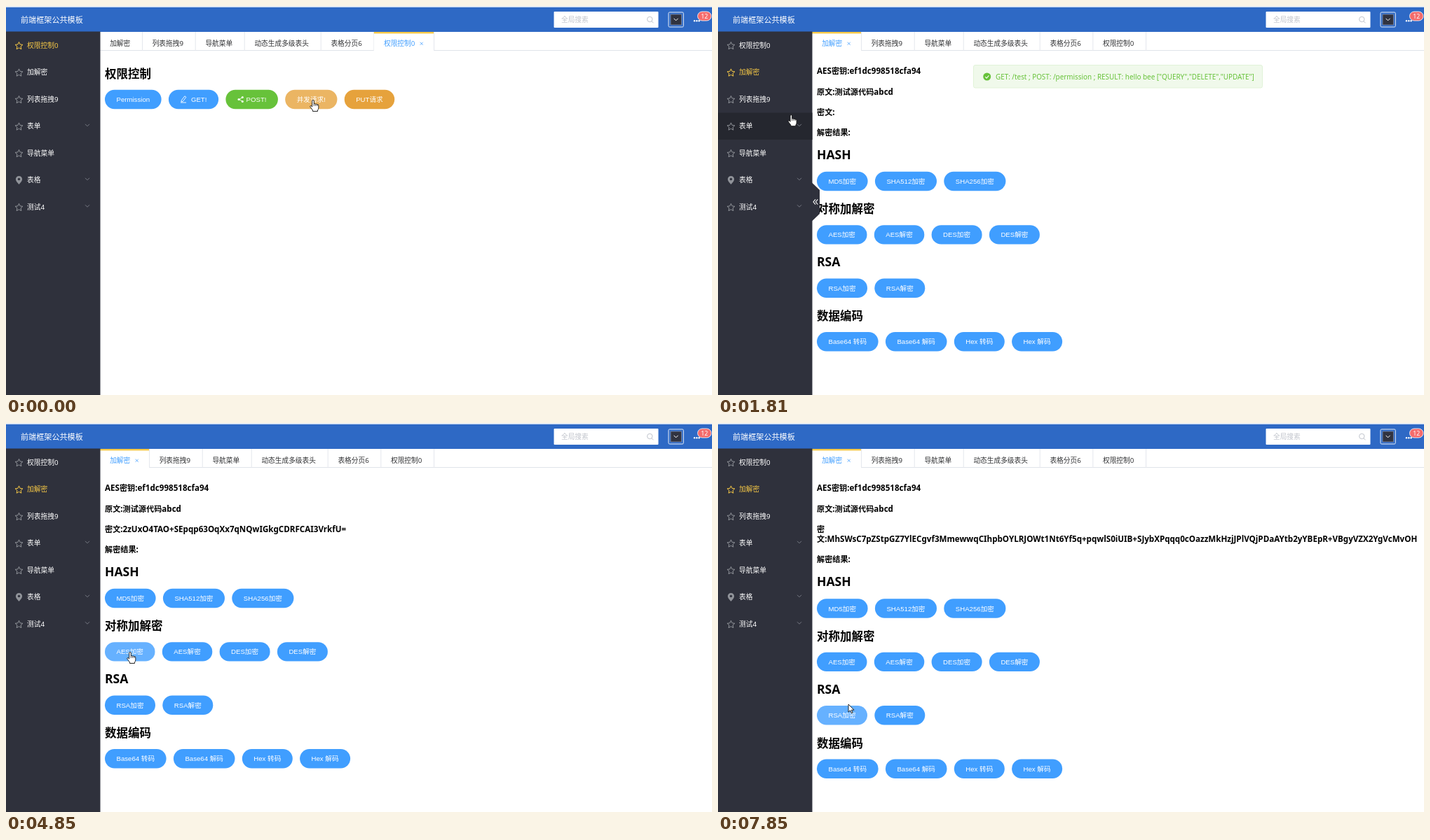
Write an HTML page that moves like this. It is 1007 px wide and 556 px high and loops after 8 s.

```html
<!DOCTYPE html>
<html lang="zh">
<head>
<meta charset="utf-8">
<style>
html, body { margin: 0; width: 100%; height: 100%; overflow: hidden; background: #fff; }
svg { display: block; width: 1007px; height: 556px; }
text { font-family: "Noto Sans", "Noto Sans CJK SC", "Noto Sans CJK", sans-serif; white-space: pre; }
.head { font-weight: 700; }
.menu { font-weight: 500; }
.button { font-family: "Liberation Sans", "Noto Sans CJK SC", "Noto Sans CJK", sans-serif; font-weight: 500; }
</style>
</head>
<body>
<svg id="stage" viewBox="0 0 1007 556"></svg>
<script>
const LOOP = 8000, SIDE = '#2f313c', HEADER = '#2e69c5', GOLD = '#f7c946', BLUE = '#409eff';
const LEFT = 141, GAP = 10.3;
const stage = document.getElementById('stage');

// Each move: first step, last step, number of steps, destination of the pointer tip
const START = [438, 135];
const MOVES = [
  [150, 1140, 8, 52, 94], [1410, 2240, 7, 185, 252], [2530, 2970, 4, 280, 257],
  [3240, 3240, 1, 330, 266], [3490, 3490, 1, 369, 271], [3890, 4420, 5, 177, 328],
  [4980, 5110, 2, 257, 330], [5520, 5780, 3, 339, 331], [6340, 6340, 1, 381, 329],
  [6480, 6620, 2, 424, 327], [7040, 7580, 5, 186, 402]
];

function hex(length, seed) {
  let out = '';
  while (out.length < length) {
    seed = (seed * 16807) % 2147483647;
    out += (seed >> 8 & 15).toString(16);
  }
  return out;
}

const PLAIN = '测试源代码abcd';
const AES = '2zUxO4TAO+SEpqp63OqXx7qNQwIGkgCDRFCAI3VrkfU=';
const DES = 'nJ6cKur4YQo4FRA8QLIJfyJcTw2yy9Hq';
const RSA = 'MhSWsC7pZStpGZ7YlECgvf3MmewwqCIhpbOYLRJOWt1Nt6Yf5q+pqwlS0iUIB+SJybXPqqq0cOazzMkHzjJPlVQjPDaAYtb2yYBEpR+VBgyVZX2YgVcMvOH';

const CLICKS = [
  { at: 0, cipher: '', focus: '并发请求!', result: '' },
  { at: 1410, cipher: '', focus: '', result: '' },
  { at: 2390, cipher: 'afb6fdd3a39e1b8c3383bd971473d141', focus: 'MD5加密', result: '' },
  { at: 3100, cipher: hex(128, 4711), focus: 'SHA512加密', result: '' },
  { at: 3620, cipher: 'b691730caab6d5bb3365252045febbbcf040e2c5bdc21e6f863e7827264a8816', focus: 'SHA256加密', result: '' },
  { at: 4570, cipher: AES, focus: 'AES加密', result: '' },
  { at: 5240, cipher: AES, focus: 'AES解密', result: PLAIN },
  { at: 5910, cipher: DES, focus: 'DES加密', result: '' },
  { at: 6760, cipher: DES, focus: 'DES解密', result: PLAIN },
  { at: 7715, cipher: RSA, focus: 'RSA加密', result: '' }
];

const MENU = ['权限控制0', '加解密', '列表拖拽9', '表单', '导航菜单', '表格', '测试4'];
const TABS = [['加解密', 60.5], ['列表拖拽9', 75.7], ['导航菜单', 70], ['动态生成多级表头', 109],
  ['表格分页6', 75.6], ['权限控制0', 75.7]];
const TONES = { blue: [BLUE, '#66b1ff'], green: ['#67c23a', '#85ce61'], amber: ['#e6a23c', '#ebb563'] };

// Button: label, width, tone, label offset when an icon precedes it
const ACTIONS = [['Permission', 80.6, 'blue'], ['GET!', 71.2, 'blue', 32], ['POST!', 74.5, 'green', 29.2],
  ['并发请求!', 74.2, 'amber'], ['PUT请求', 71.5, 'amber']];
const GROUPS = [
  ['HASH', 212.5, [['MD5加密', 72.6], ['SHA512加密', 88.1], ['SHA256加密', 88.1]]],
  ['对称加解密', 290, [['AES加密', 71.5], ['AES解密', 71.5], ['DES加密', 72], ['DES解密', 72]]],
  ['RSA', 366, [['RSA加密', 72], ['RSA解密', 72]]],
  ['数据编码', 443, [['Base64 转码', 87.6], ['Base64 解码', 87.6], ['Hex 转码', 72], ['Hex 解码', 72]]]
];

const rect = (x, y, w, h, fill, extra = '') =>
  `<rect x="${x}" y="${y}" width="${w}" height="${h}" fill="${fill}" ${extra}/>`;
const line = (d, stroke, width = 1, extra = '') =>
  `<path d="${d}" fill="none" stroke="${stroke}" stroke-width="${width}" ${extra}/>`;
const esc = s => s.replace(/&/g, '&amp;').replace(/</g, '&lt;');

// Text centred vertically on y; latin runs may use a slightly larger size
function text(s, x, y, size, fill, { cls = '', anchor = 'start', latin = size } = {}) {
  const runs = s.split(/([\u3000-\u9fff]+)/).filter(Boolean)
    .map(r => r > '\u3000' ? esc(r) : `<tspan font-size="${latin}">${esc(r)}</tspan>`).join('');
  return `<text x="${x}" y="${y + size * 0.365}" font-size="${size}" fill="${fill}" class="${cls}" text-anchor="${anchor}">${runs}</text>`;
}
const title = (s, y) => text(s, LEFT, y, 16.5, '#000', { cls: 'head', latin: 17.6 });
const field = (s, y) => text(s, LEFT, y, 11.15, '#000', { cls: 'head', latin: 11.6 });

function star(x, y, color) {
  let d = '';
  for (let i = 0; i < 10; i++) {
    const a = i * Math.PI / 5 - Math.PI / 2, r = i % 2 ? 2.7 : 5.7;
    d += `${i ? 'L' : 'M'}${(x + r * Math.cos(a)).toFixed(2)} ${(y + r * Math.sin(a)).toFixed(2)}`;
  }
  return line(d + 'Z', color, 1, 'stroke-linejoin="round"');
}
const chevron = (x, y, color) => line(`M${x - 3} ${y - 1.5}l3 3 3-3`, color);

function pointerAt(t) {
  let [x, y] = START;
  for (const [from, to, steps, tx, ty] of MOVES) {
    if (t < from) break;
    const step = steps > 1 ? Math.floor((t - from) / ((to - from) / (steps - 1)) + 1e-6) + 1 : 1;
    const p = Math.min(1, step / steps), e = p * p * (3 - 2 * p);
    x += (tx - x) * e;
    y += (ty - y) * e;
  }
  return { x, y };
}

function header() {
  return rect(0, 0, 1007, 37, HEADER) + rect(0, 0, 1007, 1.8, '#e9eff7') +
    text('前端框架公共模板', 21, 19.5, 11.1, '#fff', { cls: 'menu' }) +
    rect(781.5, 8, 149, 23, '#fff', 'rx="1"') + text('全局搜索', 792, 19.5, 9.7, '#c0c4cc') +
    `<circle cx="918.3" cy="19" r="3.7" fill="none" stroke="#c0c4cc"/>` + line('M921 21.8l2.5 2.5', '#c0c4cc') +
    rect(945, 9, 21.3, 21, HEADER, 'stroke="#e6edf7" rx="1.5"') + rect(948, 12, 15.3, 15, '#303340', 'stroke="#8993a8" stroke-width=".7"') +
    chevron(955.6, 19.3, '#fff') +
    [982, 985.3, 988.6].map(x => `<circle cx="${x}" cy="21.3" r="1.2" fill="#fff"/>`).join('') +
    rect(986.5, 8, 19.5, 13, '#f56c6c', 'rx="6.5" stroke="#fff" stroke-width=".8"') +
    text('12', 996.2, 14.6, 8.8, '#fff', { anchor: 'middle' });
}

function sidebar(active, pointer) {
  let out = rect(0, 36.5, 134.5, 520, SIDE);
  MENU.forEach((name, i) => {
    const y = 56.3 + i * 38.5, on = i === active;
    if (pointer.x < 134 && Math.abs(pointer.y - y) < 19.25) out += rect(0, y - 19.25, 134.5, 38.5, '#25272f');
    out += name === '表格'
      ? `<path d="M18.5 ${y + 6.3}c-3-3.5-4.6-5-4.6-7.6a4.6 4.6 0 0 1 9.2 0c0 2.6-1.6 4.1-4.6 7.6z" fill="#909399"/><circle cx="18.5" cy="${y - 1.3}" r="1.7" fill="${SIDE}"/>`
      : star(18.5, y + 0.8, on ? GOLD : '#909399');
    out += text(name, 30, y, 9.75, on ? GOLD : '#fff', { cls: 'menu' });
    if ([3, 5, 6].includes(i)) out += chevron(116, y - 1.5, '#777a84');
  });
  if (pointer.x < 146) {
    out += `<path d="M133.5 252L145 263V297L133.5 308Z" fill="${SIDE}"/>` +
      line('M139 276.3l-3 3.7 3 3.7M142.3 276.3l-3 3.7 3 3.7', '#fff', 1.1);
  }
  return out;
}

function tabs(active) {
  let x = 134, out = line('M134 63.5H1007', '#e0e3e9');
  TABS.forEach(([name, width], i) => {
    const on = i === active, w = width + (on ? 10 : 0);
    if (on) {
      out += rect(x, 37, w, 27.5, '#fff') + rect(x, 37, w, 2.4, GOLD);
      const c = x + w - 17.8;
      out += line(`M${c - 2} 51.7l4 4m0-4l-4 4`, BLUE, 0.8);
    }
    out += text(name, x + 14.2, 53, 9.7, on ? BLUE : '#303133');
    x += w;
    out += line(`M${x} 37V64`, '#e4e7ed');
  });
  return out;
}

function buttonRow(row, y, focus, pointer) {
  let left = LEFT;
  const inRow = Math.abs(pointer.y - y) < 13.7;
  return row.map(([label, width, tone = 'blue', offset]) => {
    const x = left, right = x + width;
    left = right + GAP;
    const hover = inRow && pointer.x > x && pointer.x < right;
    if (inRow && pointer.x > x - 5 && pointer.x < right + 5) pointer.hand = true;
    return rect(x, y - 13.7, width, 27.4, TONES[tone][hover || focus === label ? 1 : 0], 'rx="13.7"') +
      text(label, x + (offset || width / 2), y, 9.65, '#fff', { cls: 'button', anchor: offset ? 'start' : 'middle' });
  }).join('');
}

function permissionPage(state, pointer) {
  return title('权限控制', 96.5) + buttonRow(ACTIONS, 133.5, state.focus, pointer) +
    line('M250.3 134.8l4.6-6 2 1.5-4.6 6-2.4.8zM249 138h8', '#fff', 0.9) +
    line('M337.3 130.8l-5 2.7 5 2.7', '#fff', 0.9) +
    [[337.3, 130.6], [332, 133.5], [337.3, 136.4]].map(([x, y]) => `<circle cx="${x}" cy="${y}" r="1.5" fill="#fff"/>`).join('');
}

function cryptoPage(state, pointer) {
  const shift = state.cipher.length > 100 ? 14.5 : 0;
  let out = field('AES密钥:ef1dc998518cfa94', 93) + field('原文:' + PLAIN, 122.5);
  out += shift ? field('密', 151.5) + field('文:' + state.cipher, 166) : field('密文:' + state.cipher, 151.5);
  out += field('解密结果:' + state.result, 180.5 + shift);
  GROUPS.forEach(([name, y, row], i) => {
    out += title(name, y + shift) + buttonRow(row, 250.5 + i * 76.4 + shift, state.focus, pointer);
  });
  return out;
}

function message(t) {
  const step = Math.floor(t / 140) * 140;
  const clamp = v => Math.max(0, Math.min(1, v));
  const p = Math.min(clamp((step - 150) / 400), clamp((2240 - step) / 280));
  if (p === 0) return '';
  return `<g opacity="${p}" transform="translate(0 ${(p - 1) * 33})">` +
    rect(364.5, 84.5, 412, 32.5, '#f0f9eb', 'rx="2.5" stroke="#e1f3d8"') +
    `<circle cx="383.7" cy="101" r="5.5" fill="#67c23a"/>` + line('M381.2 101.2l1.9 1.9 3.3-3.7', '#fff', 1.1) +
    text('GET: /test ; POST: /permission ; RESULT: hello bee ["QUERY","DELETE","UPDATE"]', 396, 101, 9.87, '#67c23a') + '</g>';
}

function cursor({ x, y, hand }) {
  const shape = hand
    ? 'M-1.3 7.5V.8a1.3 1.3 0 0 1 2.6 0V5q1.2-.8 2.3.3 1.3-.7 2.2.5 2-.5 2 1.7V10.5q0 2-1.3 3.5V15.5H-.5V14L-3.8 9.5q-1-1.7.4-2 1.2-.1 2.1 1.6z'
    : 'M0 0V11.2L2.6 8.8 4.4 12.8 6.1 12 4.4 8.2H8Z';
  return `<path transform="translate(${x.toFixed(2)} ${y.toFixed(2)})" d="${shape}" fill="#fff" stroke="#111" stroke-width=".9" stroke-linejoin="round"/>` +
    (hand ? line(`M${x + 1.3} ${y + 5}v3m2.3-2.7v2.7m2.2-2.2v2.2`, '#111', 0.7) : '');
}

function scene(t) {
  const state = CLICKS.filter(c => c.at <= t).pop();
  const pointer = pointerAt(t);
  const first = t < 1410;
  if (pointer.x < 134) pointer.hand = true;
  const page = (first ? permissionPage : cryptoPage)(state, pointer);
  return rect(0, 0, 1007, 556, '#fff') + tabs(first ? 5 : 0) + page + header() +
    sidebar(first ? 0 : 1, pointer) + message(t) + cursor(pointer);
}

let shown = '';
function draw(now) {
  const markup = scene(now % LOOP);
  if (markup !== shown) stage.innerHTML = shown = markup;
  requestAnimationFrame(draw);
}
draw(performance.now());
</script>
</body>
</html>
```
